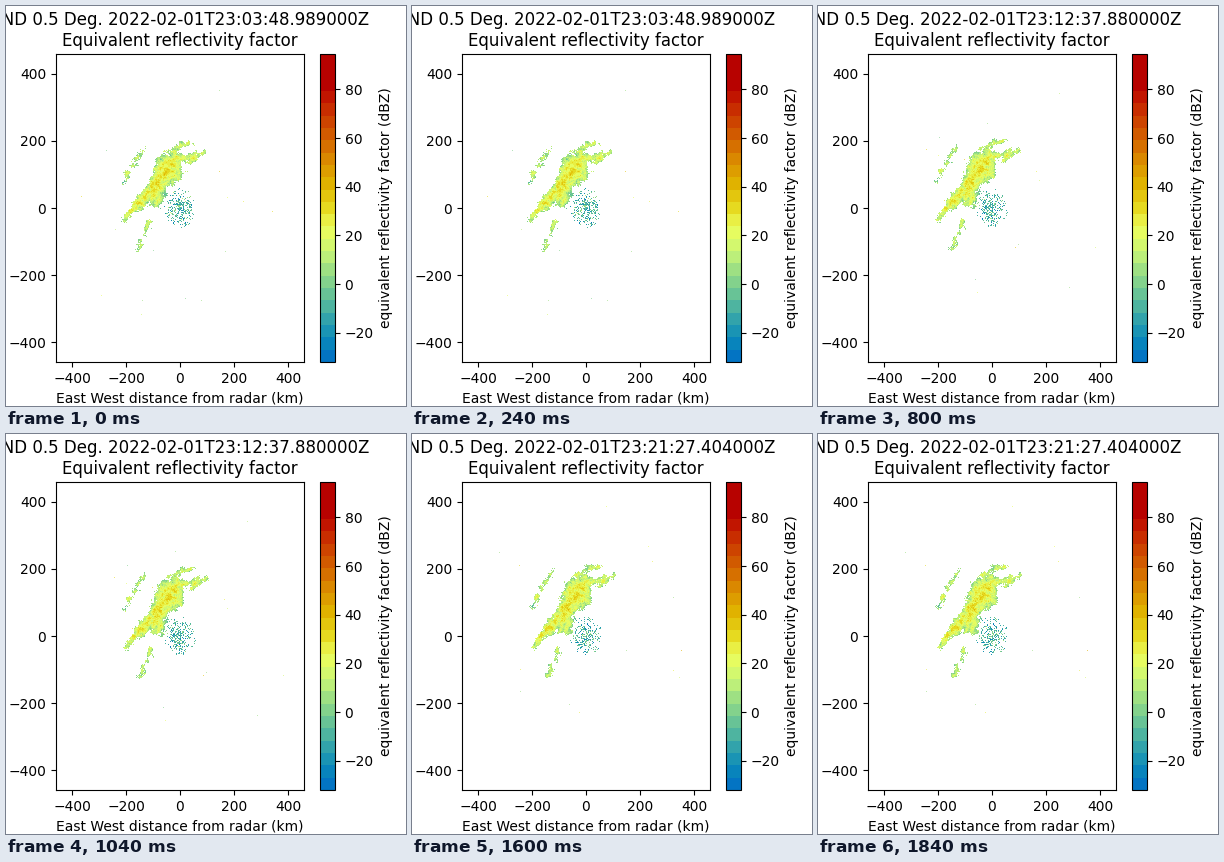
A matplotlib script that plays this animation: 400x400 px, repeating every 2 s.

```python
import numpy as np
import matplotlib.pyplot as plt
from matplotlib.animation import FuncAnimation
from matplotlib.cm import ScalarMappable
from matplotlib.colors import LinearSegmentedColormap, ListedColormap, Normalize

LEFT, TOP, W, H = 50, 48, 248, 308
RANGE = 459.2
RADAR = LEFT + W / 2, TOP + H / 2
CLOCK = ["23:03:48.989", "23:08:13.777", "23:12:37.880",
         "23:17:02.598", "23:21:27.404"]
STEPS = len(CLOCK)

# Echo strokes: key points as x, y, half-width
ECHOES = {
    "body": [(150, 193, 8), (153, 177, 10), (163, 161, 14), (167, 166, 11)],
    "band": [(150, 182, 7), (133, 197, 5.5), (118, 214, 2)],
    "crest": [(164, 147, 4), (172, 140, 2.5), (187, 138, 1.5)],
    "arm": [(168, 152, 6), (187, 152, 3.5), (200, 146, 1.5)],
    "wisp": [(140, 140, 1), (130, 154, 1.6), (117, 176, 1)],
    "tail": [(144, 216, 1), (132, 242, 1.5)],
}
RIDGE = [(124, 204, 0), (146, 183, 0), (166, 158, 0)]


def rainbow(levels=25, n=15):
    """Stepped blue-green-yellow-red map traced through YUV space."""
    k = n * 2 // 5
    y = np.r_[np.linspace(.3, .85, k), np.linspace(.9, 0, n - k)]
    u = .4 * np.sin(np.linspace(.8, 1.8, n) * np.pi)
    v = .55 * np.sin(np.linspace(-.33, .33, n) * np.pi) + .1
    rgb = np.c_[y + 1.13983 * v, y - .39465 * u - .5806 * v, y + 2.03211 * u]
    smooth = LinearSegmentedColormap.from_list("yuv", np.clip(rgb, 0, 1))
    f = (np.arange(levels) + .5) / levels
    return ListedColormap(smooth(np.where(f > .87, .92, f)))


def soft_noise(rng, sigma):
    """Gaussian-filtered white noise with unit spread."""
    fy = np.fft.fftfreq(H)[:, None]
    fx = np.fft.fftfreq(W)[None]
    kernel = np.exp(-2 * (np.pi * sigma) ** 2 * (fx ** 2 + fy ** 2))
    out = np.fft.ifft2(np.fft.fft2(rng.standard_normal((H, W))) * kernel).real
    return out / out.std()


def depth(points):
    """How far each pixel lies inside a stroke of varying half-width."""
    best = np.full((H, W), -99.0)
    for (x0, y0, r0), (x1, y1, r1) in zip(points, points[1:]):
        dx, dy = x1 - x0, y1 - y0
        s = ((X - x0) * dx + (Y - y0) * dy) / (dx * dx + dy * dy)
        s = np.clip(s, 0, 1)
        d = np.hypot(X - x0 - s * dx, Y - y0 - s * dy)
        best = np.maximum(best, r0 + s * (r1 - r0) - d)
    return best


def drift(stroke, t):
    """Storm motion: eastward, and northward faster the further north."""
    return [(x + 3 * t, y - t * max(216 - y, 0) / 14, r) for x, y, r in stroke]


def scan(i):
    """RGBA image of the sweep at step i."""
    t = i / (STEPS - 1)
    rng = np.random.default_rng(40 + i)
    grain, speckle = rng.standard_normal((2, H, W))
    shape, tone = np.roll(FIELDS, (-i, i), (1, 2))

    inside = np.max([depth(drift(s, t)) for s in ECHOES.values()], axis=0)
    cover = inside + 1.2 * shape + .4 * soft_noise(rng, 1.2) + .8 * grain
    ridge = np.exp(-(depth(drift(RIDGE, t)) / 5) ** 2)
    dbz = 5 + 3.6 * np.clip(cover, 0, 4) + 9 * ridge + 3.5 * tone + 2.5 * speckle
    rgba = cmap(norm(dbz))
    rgba[..., 3] = cover > 0

    # Ground clutter around the radar
    rho = np.hypot((X - RADAR[0]) / 13.5, (Y - RADAR[1]) / 16.7)
    chance = .55 * np.exp(-1.4 * rho ** 2) * (rho < 1.2)
    clutter = (rng.random((H, W)) < chance) & (cover <= 0)
    rgba[clutter] = cmap(norm(rng.normal(-9, 8, clutter.sum())))

    # Stray single-gate returns
    n = rng.integers(11, 17)
    angle, reach = rng.uniform(0, 2 * np.pi, n), rng.uniform(.3, .95, n)
    col = (W / 2 * (1 + reach * np.cos(angle))).astype(int)
    row = (H / 2 * (1 + reach * np.sin(angle))).astype(int)
    rgba[row, col] = cmap(norm(rng.uniform(0, 40, n)), alpha=.6)
    return rgba


Y, X = np.mgrid[TOP:TOP + H, LEFT:LEFT + W] + .5
base = np.random.default_rng(7)
FIELDS = np.array([soft_noise(base, 1.5), soft_noise(base, 1.1)])
cmap = rainbow()
norm = Normalize(-32, 94.5)
scans = [scan(i) for i in range(STEPS)]

fig, ax = plt.subplots(figsize=(4, 4), dpi=100)
fig.subplots_adjust(left=.125, right=.9, bottom=.11, top=.88)
fig.colorbar(ScalarMappable(norm, cmap), ax=ax,
             label="equivalent reflectivity factor (dBZ)")
image = ax.imshow(scans[0], extent=(-RANGE, RANGE, -RANGE, RANGE),
                  aspect="auto", interpolation="nearest")
ax.set_xticks(range(-400, 401, 200))
ax.set_yticks(range(-400, 401, 200))
ax.set_xlabel("East West distance from radar (km)")
title = ax.set_title("")


def update(i):
    image.set_data(scans[i])
    title.set_text(f"   ND 0.5 Deg. 2022-02-01T{CLOCK[i]}000Z \n"
                   "Equivalent reflectivity factor")
    return image, title


anim = FuncAnimation(fig, update, frames=STEPS, interval=400,
                     init_func=lambda: update(0), repeat=True, repeat_delay=0)
plt.show()
```
